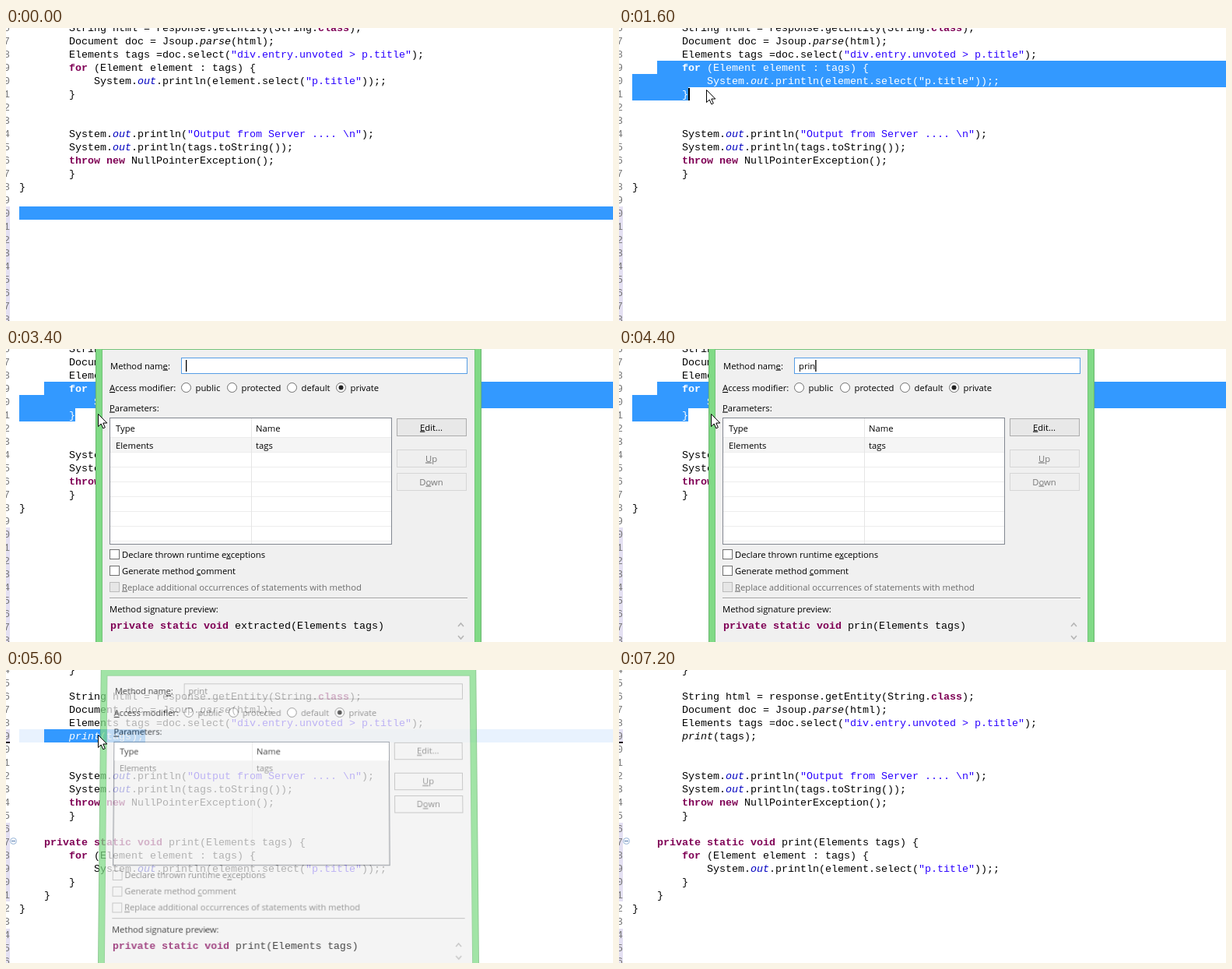
Write an HTML page that moves like this. It is 780x376 px and loops after 7400 ms.

```html
<!DOCTYPE html>
<html lang="en">
<head>
<meta charset="utf-8">
<title>Extract method</title>
<style>
html, body { margin: 0; width: 100%; height: 100%; overflow: hidden; background: #fff; }
#stage { position: relative; width: 780px; height: 376px; overflow: hidden; background: #fff; }
svg { position: absolute; left: 0; top: 0; width: 780px; height: 376px; overflow: visible; }
text { white-space: pre; }
.code text, .mono { font: 13.333px "Liberation Mono", monospace; fill: #000; }
.code .num { fill: #787878; }
.kw { fill: #7f0055; font-weight: bold; }
.str { fill: #2a00ff; }
.field { fill: #0000c0; font-style: italic; }
.call { font-style: italic; }
.code .sel, .sel tspan { fill: #fff; }
#dialog { transform-origin: 0 0; }
#dialog text:not(.mono) { font: 11.25px "Open Sans", sans-serif; }
.key { text-decoration: underline; }
.busy .input rect { fill: #f0f0f0; stroke: #b4b4b4; }
.busy .input text { fill: #6d6d6d; }
.busy .rule { display: none; }
</style>
</head>
<body>
<div id="stage">
  <svg id="code" class="code"></svg>
  <svg id="dialog"></svg>
  <svg id="pointer"><path d="M.5 .5V16.5L4.2 13L6.8 18.8L9.3 17.7L6.8 12H11.8Z" fill="#fff" stroke="#000"/></svg>
</div>
<script>
const LOOP = 7400, STEP = 200, ROW = 17, COL = 8;
const $ = id => document.getElementById(id);
const code = $('code'), dialog = $('dialog'), pointer = $('pointer');

const rect = (x, y, w, h, fill, stroke = 'none') =>
  `<rect x="${x}" y="${y}" width="${w}" height="${h}" fill="${fill}" stroke="${stroke}"/>`;
const line = (x1, y1, x2, y2, stroke) =>
  `<path d="M${x1} ${y1}L${x2} ${y2}" stroke="${stroke}"/>`;

// ---- editor ----
const head = [
  [8, 'String html = response.getEntity(String.class);'],
  [8, 'Document doc = Jsoup.parse(html);'],
  [8, 'Elements tags =doc.select("div.entry.unvoted > p.title");']
];
const loop = [
  [8, 'for (Element element : tags) {'],
  [12, 'System.out.println(element.select("p.title"));;'],
  [8, '}']
];
const tail = [
  [8, 'System.out.println("Output from Server .... \\n");'],
  [8, 'System.out.println(tags.toString());'],
  [8, 'throw new NullPointerException();'],
  [8, '}']
];
const before = {
  first: 6,
  lines: [...head, ...loop, 0, 0, ...tail, [0, '}']],
  ruler: [[229, 150]]
};
const after = {
  first: 4,
  lines: [[8, '}'], 0, ...head, [8, 'print(tags);'], 0, 0, ...tail, 0,
    [4, 'private static void print(Elements tags) {'], ...loop, [4, '}'], [0, '}']],
  ruler: [[76, 17], [196, 101], [332, 50]]
};

const TOKEN = /("[^"]*")|\b(for|throw|new|class|private|static|void)\b|\b(out)\b|\b(parse|print(?=\(tags))\b/g;
const paint = s => s.replace(TOKEN, (m, str, kw, field) =>
  `<tspan class="${str ? 'str' : kw ? 'kw' : field ? 'field' : 'call'}">${m}</tspan>`);

function selection(t) {
  if (t < 1400) return [[17, 229, 780]];
  if (t < 1600) return [[49, 42, 780], [17, 59, 113]];
  if (t < 5600) return [[49, 42, 780], [17, 59, 780], [17, 76, 89]];
  return t < 6400 ? [[49, 76, 179]] : [];
}

function drawCode(t) {
  const { first, lines, ruler } = t < 5600 ? before : after;
  const marks = selection(t);
  let out = ruler.map(([y, h]) => rect(0, y, 5, h, '#e4e0f2')).join('');
  if (t >= 5600 && t < 6400) out += rect(17, 76, 763, ROW, '#e8f2fe');
  out += marks.map(([x, y, end]) => rect(x, y, end - x, ROW, '#3399ff')).join('');
  for (let i = 0; i < 23; i++) {
    const y = 4 + i * ROW;
    out += `<text class="num" x="-3" y="${y}">${(first + i) % 10}</text>`;
    if (!lines[i]) continue;
    const [col, text] = lines[i];
    const on = marks.some(m => m[1] === y - 13);
    out += `<text class="${on ? 'sel' : ''}" x="${17 + col * COL}" y="${y}">${paint(text)}</text>`;
  }
  if (t >= 5600) {
    out += rect(0, 92, 5, 2, '#201018') +
      '<circle cx="9.5" cy="219.5" r="4" fill="#f4f8ff" stroke="#9db8d8"/>' +
      line(7, 219.5, 12, 219.5, '#5f83b0');
  }
  if (t >= 1600 && t < 3000 && (t - 1600) % 1000 < 500) out += rect(89, 77, 2, 16, '#000');
  code.innerHTML = out;
}

// ---- dialog ----
const label = (x, y, s, fill = '#000', anchor = 'start') =>
  `<text x="${x}" y="${y}" fill="${fill}" text-anchor="${anchor}">` +
  s.replace(/_(.)/, '<tspan class="key">$1</tspan>') + '</text>';
const input = (...parts) => `<g class="input">${parts.join('')}</g>`;
const button = (y, s, on) => input(
  rect(502.5, y + .5, 89, 22, on ? '#e8e8e8' : '#efefef', on ? '#acacac' : '#d6d6d6'),
  label(546.5, y + 15.5, s, on ? '#000' : '#787878', 'middle'));
const check = (y, s, on) => input(
  rect(133.5, y + .5, 12, 12, on ? '#fff' : '#e6e6e6', on ? '#707070' : '#bcbcbc'),
  label(149, y + 10.5, s, on ? '#000' : '#6d6d6d'));
const radio = (x, s, on) => input(
  `<circle cx="${x}" cy="49.5" r="6" fill="#fff" stroke="#707070"/>`,
  on ? `<circle cx="${x}" cy="49.5" r="3" fill="#222"/>` : '',
  label(x + 12, 54, s));
const chevron = (y, d) =>
  `<path d="M581 ${y}l3.5 ${d}l3.5 ${-d}" fill="none" stroke="#b4b4b4" stroke-width="1.5"/>`;

let rules = rect(134, 114, 361, 19, '#f5f5f5');
for (let y = 113.5; y < 250; y += 19) rules += line(134, y, 495, y, '#ededed');
const table =
  input(rect(134, 89, 361, 161, '#fff')) + rect(134, 89, 361, 24, '#fff') +
  `<g class="rule">${rules}</g>` + line(315.5, 89, 315.5, 250, '#e5e5e5') +
  rect(133.5, 88.5, 362, 162, 'none', '#828790') +
  label(141, 105.5, 'Type') + label(321, 105.5, 'Name') +
  input(label(141, 127.5, 'Elements'), label(321, 127.5, 'tags'));

dialog.innerHTML =
  rect(115.5, -80, 495, 540, '#80da86', '#69b56e') +
  rect(123.5, .5, 479, 459, '#f0f0f0', '#74c47a') +
  label(134, 25.5, 'Method nam_e:') +
  input(rect(225.5, 11.5, 367, 20, '#fff', '#569de5'), '<text id="name" x="231" y="25.5"></text>') +
  '<rect id="caret" y="14" width="1.3" height="15"/>' +
  label(133, 54, '_Access modifier:') +
  radio(231.5, 'public') + radio(290.5, 'protected') + radio(367.5, 'default') + radio(430.5, 'private', true) +
  label(133, 79.5, '_Parameters:') + table +
  button(89, '_Edit...', true) + button(129, '_Up') + button(159, 'D_own') +
  check(257, 'Declare thrown runtime e_xceptions', true) +
  check(278, 'Generate method _comment', true) +
  check(299, '_Replace additional occurrences of statements with method') +
  line(133, 319.5, 593, 319.5, '#a0a0a0') + line(133, 320.5, 593, 320.5, '#fff') +
  label(133, 338, 'Method signature preview:') +
  '<text id="preview" class="mono" x="134" y="359"></text>' +
  chevron(356, -4) + chevron(368, 4);

const nameText = $('name'), nameCaret = $('caret'), preview = $('preview');

// Tilted pose: s = width scale, k = taper per pixel, a + b*y = height mapping
const tilt = (s, k, a, b) =>
  `matrix3d(${s},0,0,0, ${363 * k},${b},0,${k}, 0,0,1,0, ${363 * (1 - s)},${a},0,1)`;
const OPENING = tilt(.948, 8.6e-5, 4.6, .974);
const CLOSING = tilt(.973, -4e-5, 6.73, .9641);

function drawDialog(t) {
  const shown = t >= 3000 && t < 5800;
  dialog.style.display = shown ? 'block' : 'none';
  if (!shown) return;
  const opening = t < 3200, busy = t >= 5400, closing = t >= 5600;
  dialog.classList.toggle('busy', busy);
  dialog.style.opacity = opening ? .32 : closing ? .74 : 1;
  dialog.style.transform = opening ? OPENING : closing ? CLOSING : 'none';
  const name = 'print'.slice(0, Math.max(0, (t - 3600) / STEP));
  nameText.textContent = name;
  nameCaret.setAttribute('x', 231 + (name ? nameText.getComputedTextLength() : 0));
  const typing = t >= 3800 && t < 4800;
  const lit = !opening && !busy && (typing || (t - 3200) % 1000 < 600);
  nameCaret.style.display = lit ? 'inline' : 'none';
  preview.innerHTML = paint('private static void') + ` ${name || 'extracted'}(Elements tags)`;
}

// ---- pointer: time, x, y ----
const path = [
  [1200, 49, 50], [1400, 112, 66], [1600, 112, 79], [2200, 118, 83],
  [6200, 118, 83], [6800, 784, 345]
];

function drawPointer(t) {
  const i = path.findIndex(p => p[0] > t);
  pointer.style.display = i > 0 ? 'block' : 'none';
  if (i < 1) return;
  const [t0, x0, y0] = path[i - 1], [t1, x1, y1] = path[i];
  const f = (t - t0) / (t1 - t0);
  const x = Math.round(x0 + (x1 - x0) * f), y = Math.round(y0 + (y1 - y0) * f);
  pointer.style.transform = `translate(${x}px, ${y}px)`;
}

let last = -1;
const start = performance.now();
function frame() {
  const t = Math.floor((performance.now() - start) % LOOP / STEP) * STEP;
  if (t !== last) {
    last = t;
    drawCode(t);
    drawDialog(t);
    drawPointer(t);
  }
  requestAnimationFrame(frame);
}
frame();
</script>
</body>
</html>
```
